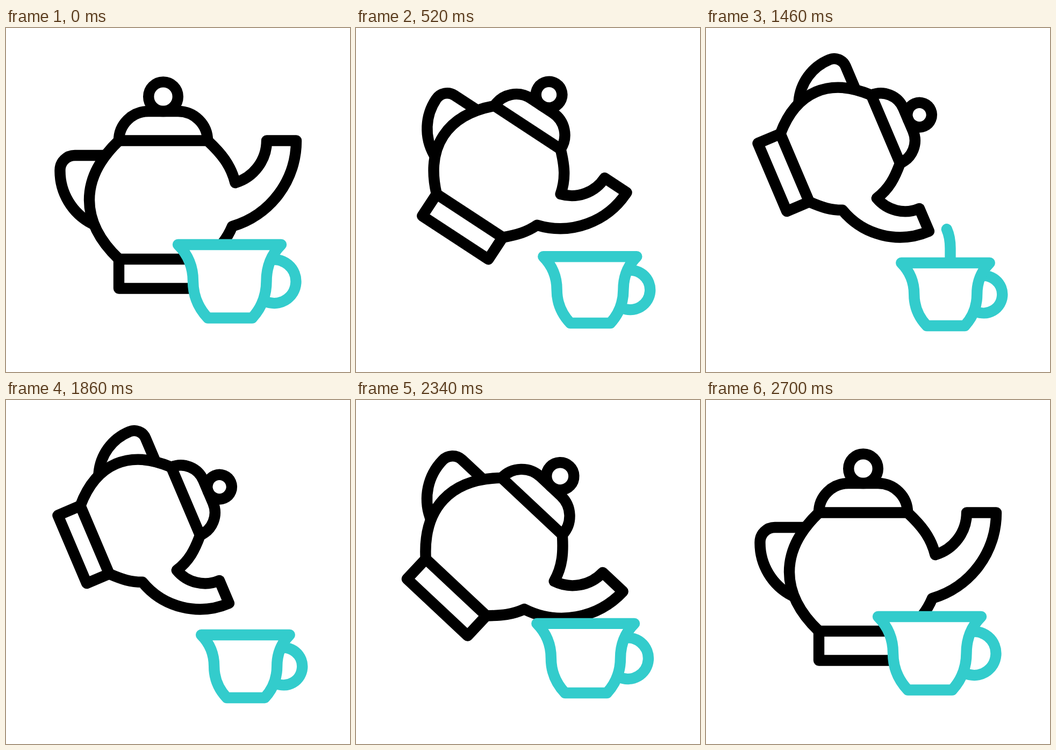
An HTML page that plays this animation: 640 px wide and 640 px high, repeating every 3.6 s.

```html
<!DOCTYPE html>
<html lang="en">
<head>
<meta charset="utf-8">
<title>Teapot and cup</title>
<style>
  html, body { margin: 0; width: 100%; height: 100%; overflow: hidden; background: #fff; }
  svg { display: block; width: 100%; height: 100%; }
  path, circle {
    fill: none; stroke-width: 20.4; stroke-linecap: round; stroke-linejoin: round;
    vector-effect: non-scaling-stroke;
  }
  #pot { stroke: #000; }
  #cup, #tea { stroke: #3cc; }
  #cup .body { fill: #fff; }
  #tea { vector-effect: none; }
</style>
</head>
<body>
<svg viewBox="0 0 640 640">
  <g id="pot">
    <circle cx="292.5" cy="127.7" r="27.3"/>
    <path d="M210 209.5A55 54.5 0 0 1 265 155H320A55 54.5 0 0 1 375 209.5Z"/>
    <path d="M182 237H128A27.5 27.5 0 0 0 100.5 264.5A110.5 110.5 0 0 0 160 364"/>
    <path d="M210 209.5C178 240 155 277 155 320S178 399.5 210 430"/>
    <path d="M375 209.5C400 233 418 254 426.5 288A82 82 0 0 0 485 209.5H540A165.5 165.5 0 0 1 421 369C411 393 398 408 375 430"/>
    <path d="M210 430H375V484.5H210Z"/>
  </g>
  <path id="tea" pathLength="1" d="M421 354C442 354 454.5 378 454.5 410V437"/>
  <g id="cup">
    <path d="M488 432.5A40.5 40.5 0 1 1 482 508.3"/>
    <path class="body" d="M320 403H512C494 421 484.5 444 484.5 471S475 521 458 539.5H375.5C358 521 348 498 348 471S338 421 320 403Z"/>
  </g>
</svg>
<script>
  const LOOP = 3600;
  const [pot, tea, cup] = ['pot', 'tea', 'cup'].map(id => document.getElementById(id));

  const part = (t, from, to) => Math.min(1, Math.max(0, (t - from) / (to - from)));
  const smooth = x => x * x * (3 - 2 * x);

  // cubic-bezier(x1, 0, x2, 1), solved by bisection
  const bezier = (x1, x2) => x => {
    let lo = 0, hi = 1;
    for (let i = 0; i < 24; i++) {
      const s = (lo + hi) / 2, r = 1 - s;
      if (3 * r * r * s * x1 + 3 * r * s * s * x2 + s ** 3 < x) lo = s; else hi = s;
    }
    return smooth(lo);
  };
  const tilt = bezier(0.4, 0.17);

  // Goes 0 to 1 during [a, b], then back during [c, d].
  const swing = (t, a, b, c, d, out = smooth) =>
    t < c ? out(part(t, a, b)) : 1 - smooth(part(t, c, d));

  function place(el, x, y, dx, dy, scale, turn = 0) {
    el.setAttribute('transform',
      `translate(${x + dx} ${y + dy}) rotate(${turn}) scale(${scale}) translate(${-x} ${-y})`);
  }

  function draw(t) {
    const size = swing(t, 0, 860, 1840, 2700);
    const lift = swing(t, 45, 825, 1980, 2700);
    const turn = swing(t, 235, 1080, 2097, 2700, tilt);

    place(pot, 292.5, 264, 0, -58 * lift, 1 - size / 6, 67 * turn);
    place(cup, 416, 403, 29.5 * size, 34 * size, 1 - 0.143 * size);

    const head = part(t, 1076, 1140);
    const tail = part(t, 1280, 1780);
    tea.style.display = head > tail ? '' : 'none';
    tea.setAttribute('stroke-dasharray', `${head - tail} 3`);
    tea.setAttribute('stroke-dashoffset', -tail);
  }

  let start;
  function tick(now) {
    start ??= now;
    draw((now - start) % LOOP);
    requestAnimationFrame(tick);
  }
  draw(0);
  requestAnimationFrame(tick);
</script>
</body>
</html>
```
